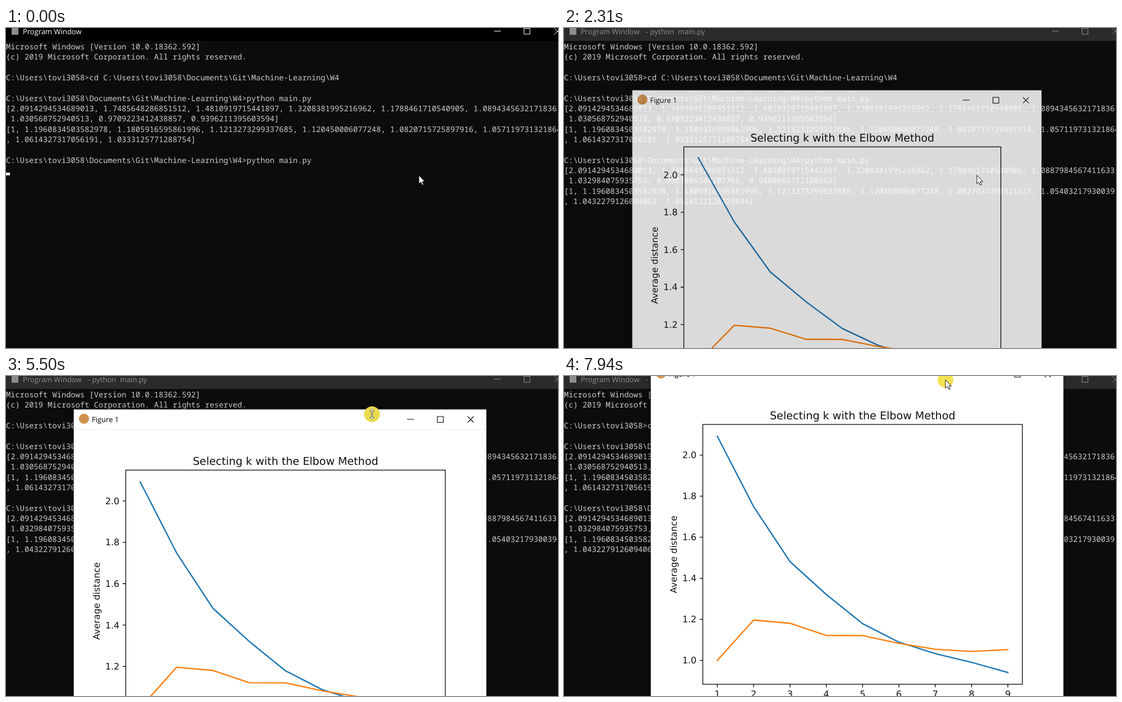
An HTML page that plays this animation: 984 by 569 pixels, repeating every 8 s.

```html
<!DOCTYPE html>
<html lang="en">
<head>
<meta charset="utf-8">
<title>Elbow method run</title>
<style>
  html, body { margin: 0; width: 100%; height: 100%; overflow: hidden; background: #0c0c0c; }
  svg { display: block; }
  text { white-space: pre; text-rendering: geometricPrecision; }
  .mono { font: 13.75px "Noto Sans Mono", monospace; fill: #ccc; }
  .ui { font: 13px "Open Sans", "Noto Sans", sans-serif; }
  .plot { font: 15.95px "DejaVu Sans", sans-serif; fill: #111; }
  .head { font-size: 19.14px; }
  .mid { text-anchor: middle; }
  .end { text-anchor: end; }
  .line { fill: none; stroke-width: 2.39; stroke-linejoin: round; stroke-linecap: square; }
  .shadow { filter: drop-shadow(0 3px 8px rgba(0, 0, 0, .4)); }
</style>
</head>
<body>
<svg width="984" height="569" viewBox="0 0 984 569">
  <rect width="984" height="569" fill="#0c0c0c"/>
  <rect id="bar" width="984" height="23"/>
  <rect x="10" width="12" height="12" fill="#8c8c8c"/>
  <g id="caption" class="ui">
    <text x="30" y="11">Program Window</text>
    <text id="task" x="146" y="11">- python  main.py</text>
  </g>
  <path id="controls" d="M870 5.5h12M923.5 .5h10.5v10.5h-10.5zM977.5 .5l11 11m0-11l-11 11" fill="none"/>
  <g id="shell" class="mono"></g>
  <g id="result" class="mono"></g>
  <rect id="caret" y="257" width="7" height="5" fill="#f2f2f2"/>
  <g id="figure"></g>
  <circle id="halo" r="14"/>
  <path id="arrow" d="M0 0V15.2L3.5 11.9 6 17.4 8.4 16.4 5.9 11H10.6Z" fill="#fff" stroke="#000" stroke-width=".9"/>
  <path id="sizer" d="M0-9.5L4-5.5H.8V5.5H4L0 9.5-4 5.5H-.8V-5.5H-4Z" fill="#fff" stroke="#444" stroke-width=".8"/>
</svg>
<script>
const LOOP = 8000;
const $ = id => document.getElementById(id);
const show = (el, on) => el.setAttribute('visibility', on ? 'visible' : 'hidden');
const place = (el, x, y) => el.setAttribute('transform', `translate(${x} ${y})`);

// Console text: keys are row numbers
const home = 'C:\\Users\\tovi3058';
const repo = home + '\\Documents\\Git\\Machine-Learning\\W4>';
const before = {
  0: 'Microsoft Windows [Version 10.0.18362.592]',
  1: '(c) 2019 Microsoft Corporation. All rights reserved.',
  3: home + '>cd ' + repo.slice(0, -1),
  5: repo + 'python main.py',
  6: '[2.0914294534689013, 1.7485648286851512, 1.4810919715441897, 1.3208381995216962, 1.1788461710540905, 1.0894345632171836,',
  7: ' 1.030568752940513, 0.9709223412438857, 0.9396211395603594]',
  8: '[1, 1.1960834503582978, 1.1805916595861996, 1.1213273299337685, 1.120450006077248, 1.0820715725897916, 1.057119731321864',
  9: ', 1.0614327317056191, 1.0333125771288754]',
  11: repo + 'python main.py'
};
const after = {
  12: '[2.0914294534689013, 1.7485648286851512, 1.4810919715441897, 1.3208381995216962, 1.1788461710540905, 1.0887984567411633,',
  13: ' 1.032984075935753, 0.9901806340207765, 0.9408685712188569]',
  14: '[1, 1.1960834503582978, 1.1805916595861996, 1.1213273299337685, 1.120450006077248, 1.0827037490321627, 1.05403217930039',
  15: ', 1.0432279126094062, 1.0524112126325844]'
};
const rows = lines => Object.entries(lines).map(([row, s]) =>
  `<text x="0" y="${37.8 + row * 18.36}">${s.replace('>', '&gt;')}</text>`).join('');
$('shell').innerHTML = rows(before);
$('result').innerHTML = rows(after);

const distance = [2.0914, 1.7486, 1.4811, 1.3208, 1.1788, 1.0888, 1.033, .9902, .9409];
const ratio = [1, 1.1961, 1.1806, 1.1213, 1.1205, 1.0827, 1.054, 1.0432, 1.0524];

// Figure window of fixed width; plot height h follows the window size
function figure(h, divider) {
  const W = 735, L = .125 * W + .6, R = .9 * W + .6, T = 35.2 + .12 * h, B = 35.2 + .89 * h;
  const mx = (L + R) / 2, my = (T + B) / 2;
  const px = k => L + (R - L) * (1 / 22 + (k - 1) * 10 / 88);
  const py = v => T + (B - T) * (2.14896 - v) / 1.26562;
  const curve = (data, color) =>
    `<polyline class="line" stroke="${color}" points="${data.map((v, i) => px(i + 1) + ',' + py(v)).join(' ')}"/>`;
  let ticks = '', labels = '';
  for (let k = 1; k <= 9; k++) {
    ticks += `M${px(k)} ${B}v5.6`;
    labels += `<text class="mid" x="${px(k)}" y="${B + 23}">${k}</text>`;
  }
  for (let i = 0; i < 6; i++) {
    const v = 1 + i / 5;
    ticks += `M${L} ${py(v)}h-5.6`;
    labels += `<text class="end" x="${L - 11.2}" y="${py(v) + 5.8}">${v.toFixed(1)}</text>`;
  }
  return `<rect class="shadow" width="${W}" height="${h + 83}" fill="#fff"/>
    <rect x="-.5" y="-.5" width="${W + 1}" height="${h + 84}" fill="none" stroke="#777" stroke-opacity=".6"/>
    ${divider ? `<path d="M0 35.5H${W}" stroke="#e6e6e6"/>` : ''}
    <circle cx="18" cy="16.5" r="9" fill="#d0914c"/>
    <text class="ui" x="32" y="22">Figure 1</text>
    <path d="M594 17.5h12M648 12.5h10.5v10.5h-10.5zM702 12.5l10.5 10.5m0-10.5l-10.5 10.5" fill="none" stroke="#000" stroke-width="1.1"/>
    <g class="plot">
      ${curve(distance, '#1f77b4')}${curve(ratio, '#ff7f0e')}
      <path d="M${L} ${T}H${R}V${B}H${L}Z${ticks}" fill="none" stroke="#000" stroke-width="1.28"/>
      ${labels}
      <text class="mid head" x="${mx}" y="${T - 9.6}">Selecting k with the Elbow Method</text>
      <text class="mid" x="${mx}" y="${B + 46}">Number of clusters</text>
      <text class="mid" transform="translate(45.5 ${my}) rotate(-90)">Average distance</text>
    </g>`;
}

// Moves: [first step, last step, step count, target...]; values hold between moves
function track(t, start, moves) {
  let from = start;
  for (const [t0, t1, n, ...to] of moves) {
    if (t < t0) break;
    const step = n > 1 ? (t1 - t0) / (n - 1) : 1;
    const done = t >= t1 ? n : Math.floor((t - t0 + 10) / step) + 1;
    const p = Math.min(1, done / n), e = p * p * (3 - 2 * p);
    from = from.map((a, i) => a + (to[i] - a) * e);
  }
  return from;
}

const windowAt = t => track(t, [121, 108], [
  [4030, 4510, 7, 121, 32],
  [4810, 4810, 1, 121, 37],
  [4900, 5200, 5, 121, 50],
  [5360, 5440, 2, 121, 59.5],
  [6080, 6230, 3, 110, 37],
  [6320, 6860, 8, 131, -52],
  [7630, 7940, 5, 155, -21]
]);
const pointerAt = t => track(t, [736, 262], [
  [2720, 3500, 11, 629, 128],
  [3800, 3800, 1, 632, 116],
  [4030, 4510, 7, 652.5, 40],
  [5520, 5680, 3, 645, 88]
]);
// Opening: [time, opacity, scale]
const opening = [[0, 0, 1], [2150, .25, .97], [2230, .6, .983], [2310, .85, .992], [2400, .97, .998], [2480, 1, 1]];

let drawn = '';
function render(t) {
  const active = t < 2150;
  $('bar').setAttribute('fill', active ? '#000' : '#2b2b2b');
  $('caption').setAttribute('fill', active ? '#fff' : '#8f8f8f');
  $('controls').setAttribute('stroke', active ? '#fff' : '#8f8f8f');
  show($('task'), t >= 60);
  show($('caret'), t < 60 || (t >= 600 && t < 1060) || (t >= 1620 && t < 2070));
  show($('result'), t >= 2070);

  const [x, y] = windowAt(t);
  const [, alpha, scale] = opening.filter(s => t >= s[0]).pop();
  // The plot redraws one step behind the dragged edge
  const h = 694.5 - 35 - windowAt(Math.min(t - 80, 6000))[1];
  const divider = t < 6080, key = h + ' ' + divider;
  const fig = $('figure');
  if (key !== drawn) {
    fig.innerHTML = figure(h, divider);
    drawn = key;
  }
  show(fig, alpha > 0);
  fig.setAttribute('opacity', alpha);
  fig.setAttribute('transform',
    `translate(230 470) scale(${scale}) translate(${x - 230} ${y - 470})`);

  const sizing = t >= 3800 && t < 5520, moving = t >= 5910;
  let [cx, cy] = pointerAt(t);
  if (sizing) cy = y + 8.5;
  if (moving) [cx, cy] = [x + 525, y + 27.8];
  show($('arrow'), !sizing);
  show($('sizer'), sizing);
  show($('halo'), moving || (sizing && t >= 3880));
  $('halo').setAttribute('fill', sizing ? '#ebdc4e' : t >= 7630 ? '#f5e253' : '#fff973');
  for (const id of ['arrow', 'sizer', 'halo']) place($(id), cx, cy);
}

const born = performance.now();
function tick() {
  render((performance.now() - born) % LOOP);
  requestAnimationFrame(tick);
}
tick();
</script>
</body>
</html>
```
